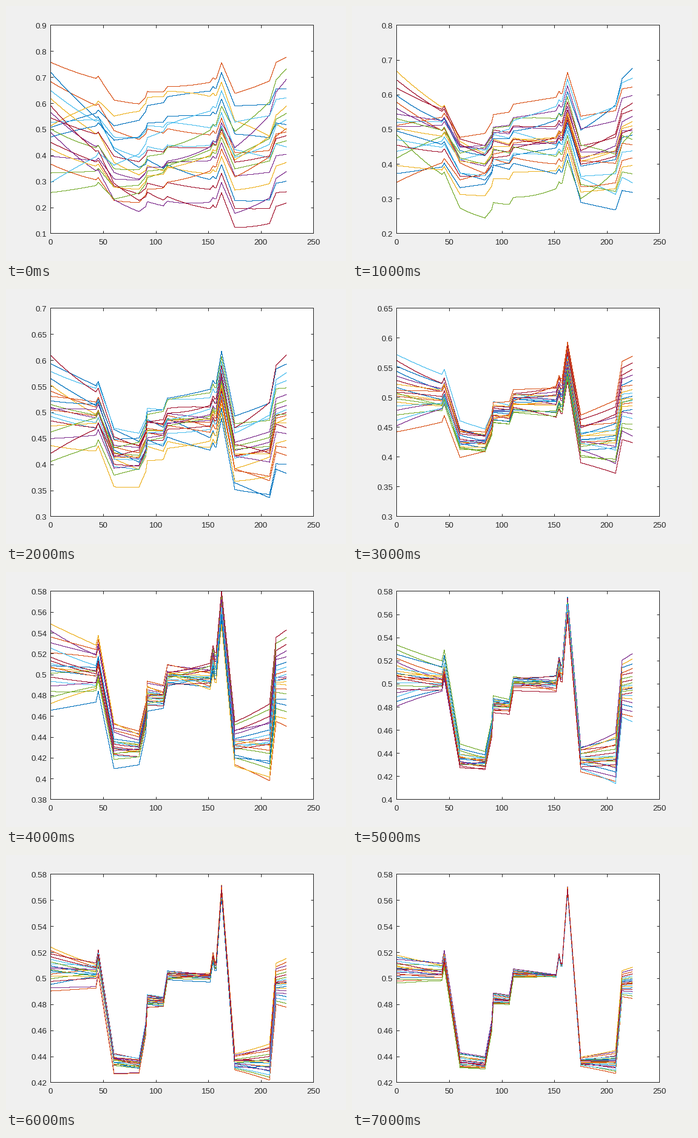
A matplotlib script for the animation above (8 s loop, 560 by 420 pixels).

```python
import numpy as np
import matplotlib.pyplot as plt
from matplotlib.animation import FuncAnimation

W, H, DPI = 560, 420, 100
PX = 72 / DPI
LEFT, TOP, AX_W, AX_H = 73.45, 31.45, 433, 343
INK = "#262626"
COLORS = ["#0072BD", "#D95319", "#EDB120", "#7E2F8E",
          "#77AC30", "#4DBEEE", "#A2142F"]
N_CURVES = 21
X_MAX = 250

# Lower limit, upper limit and tick step of the y axis, one per picture.
SCALES = [(0.1, 0.9, 0.1), (0.2, 0.8, 0.1), (0.3, 0.7, 0.05),
          (0.3, 0.65, 0.05), (0.38, 0.58, 0.02), (0.4, 0.58, 0.02),
          (0.42, 0.58, 0.02), (0.42, 0.58, 0.02)]


def to_column(x):
    return np.rint(np.array(x) * AX_W / X_MAX)


# Step profile shared by all curves; each one adds a parabola to it.
KNOTS = [0, 43, 45, 60, 84, 90, 92, 107, 111, 151, 154, 156, 157, 162,
         175, 208, 214, 224]
LEVELS = [0.507, 0.505, 0.515, 0.437, 0.435, 0.463, 0.4845, 0.4835, 0.504,
          0.5025, 0.518, 0.511, 0.511, 0.5685, 0.4365, 0.436, 0.496, 0.4965]
COLUMNS = np.arange(to_column(224) + 1)
BASE = np.interp(COLUMNS, to_column(KNOTS), LEVELS)
ANCHORS = to_column([0, 162, 224])


def crowd(g):
    """Curves of one generation; their spread decays exponentially with g."""
    rng = np.random.default_rng(g)
    u = np.linspace(-1, 1, N_CURVES)
    spread = np.sign(u) * np.abs(u) ** 1.6
    start = rng.permutation(spread)
    peak = rng.permutation(spread)
    # The end roughly follows the order at the peak.
    order = np.argsort(np.argsort(peak + rng.normal(0, 0.4, N_CURVES)))
    offsets = np.array([0.25 * np.exp(-0.45 * g) * start,
                        0.25 * np.exp(-0.68 * g) * (peak - 0.25),
                        0.28 * np.exp(-0.45 * g) * spread[order]])
    bends = np.polyfit(ANCHORS, offsets, 2)
    return BASE + (np.vander(COLUMNS, 3) @ bends).T


generations = [crowd(g) for g in range(len(SCALES))]

plt.rcParams.update({"font.family": "Liberation Sans",
                     "font.size": 13.33 * PX, "path.simplify": False})
fig = plt.figure(figsize=(W / DPI, H / DPI), dpi=DPI, facecolor="#F0F0F0")
ax = fig.add_axes([LEFT / W, 1 - (TOP + AX_H) / H, AX_W / W, AX_H / H])
ax.set_xlim(0, X_MAX)
ax.set_xticks(range(0, X_MAX + 1, 50))
ax.tick_params(direction="in", top=True, right=True, length=4.5 * PX,
               width=PX, color=INK, labelleft=False, labelbottom=False)
for spine in ax.spines.values():
    spine.set(color=INK, linewidth=PX)
plots = [ax.plot([], [], color=COLORS[k % 7], lw=PX, snap=True,
                 drawstyle="steps-mid", solid_joinstyle="miter")[0]
         for k in range(N_CURVES)]
y_labels = []


def label(value, xy, coords, dx, dy, align):
    return ax.annotate(f"{value:g}", xy, xycoords=coords, color=INK,
                       xytext=(dx * PX, dy * PX), textcoords="offset points",
                       ha=align, va="baseline", annotation_clip=False)


for x in ax.get_xticks():
    label(x, (x, 0), ("data", "axes fraction"), 0, -18.5, "center")


def draw(i):
    lo, hi, step = SCALES[i]
    ticks = np.round(np.arange(lo, hi + step / 2, step), 2)
    ax.set_ylim(lo, hi)
    ax.set_yticks(ticks)
    while y_labels:
        y_labels.pop().remove()
    for t in ticks:
        y_labels.append(label(t, (0, t), ("axes fraction", "data"),
                              -6, -5.5, "right"))
    # Whole pixel rows keep the thin lines crisp.
    row = (hi - lo) / AX_H
    for plot, y in zip(plots, generations[i]):
        plot.set_data(COLUMNS * X_MAX / AX_W, hi - np.rint((hi - y) / row) * row)
    return plots


anim = FuncAnimation(fig, draw, frames=len(SCALES), interval=1000,
                     repeat=True, repeat_delay=0, blit=False)
plt.show()
```
